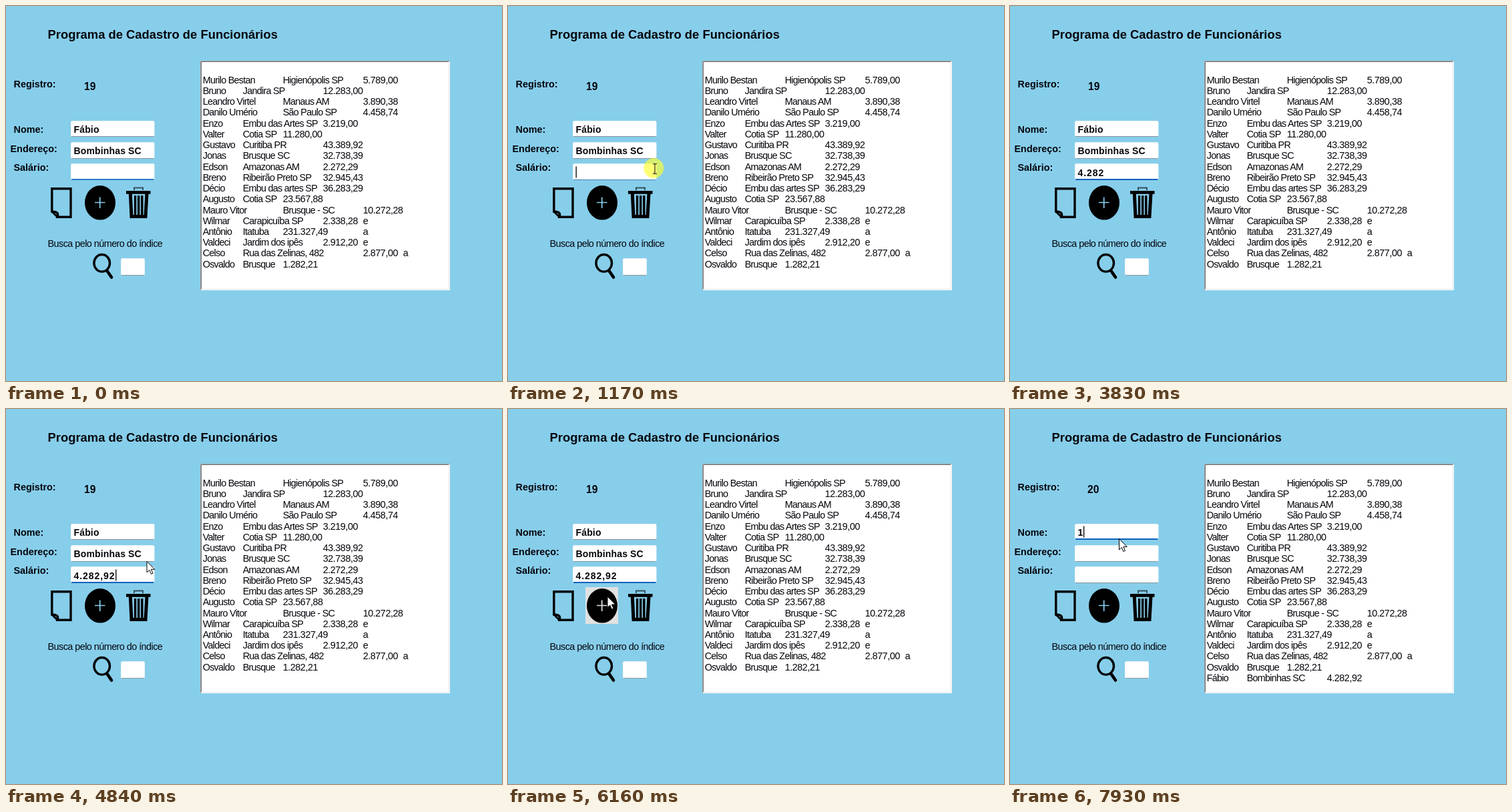
Animation, 743 px wide and 562 px high, one loop 8000 ms. Source, as an HTML page:

```html
<!DOCTYPE html>
<html lang="pt-BR">
<head>
<meta charset="utf-8">
<title>Programa de Cadastro de Funcionários</title>
<style>
html, body { margin: 0; width: 100%; height: 100%; overflow: hidden; background: #87ceeb; }
svg { display: block; width: 743px; height: 562px; }
text { font-family: "Liberation Sans", Arial, sans-serif; font-size: 14.4px; fill: #05050c; white-space: pre; }
.title { font-size: 18.4px; font-weight: bold; }
.label { font-weight: bold; }
.count { font-size: 15.6px; font-weight: bold; }
.input { font-size: 14px; font-weight: bold; letter-spacing: .15px; }
.digits { letter-spacing: .95px; }
.word { letter-spacing: -.74px; }
.number { letter-spacing: -.46px; }
.hint { letter-spacing: -.54px; }
</style>
</head>
<body>
<svg id="stage" viewBox="0 0 743 562" xmlns="http://www.w3.org/2000/svg">
  <rect width="743" height="562" fill="#87ceeb"/>
  <text class="title" x="62.5" y="49">Programa de Cadastro de Funcionários</text>
  <text class="label" x="11.5" y="122">Registro:</text>
  <text class="label" x="11.5" y="189.7">Nome:</text>
  <text class="label" x="6.5" y="218.5">Endereço:</text>
  <text class="label" x="11.5" y="247.3">Salário:</text>
  <text class="count" id="count" y="125.7"></text>
  <text class="hint" x="62.5" y="361">Busca pelo número do índice</text>

  <g id="fields"></g>

  <!-- new sheet -->
  <path d="M68.8 273.7H97V316.2H77Q80 308 68.8 308Z" fill="none" stroke="#000" stroke-width="3.4"/>
  <path d="M68.8 308L77 316.2" stroke="#000" stroke-width="3"/>

  <!-- add -->
  <rect id="hover" x="116" y="267" width="49" height="55" fill="#e1e1e1"/>
  <ellipse cx="141" cy="294.8" rx="23" ry="25.8"/>
  <path id="plus" d="M133 294.5H148.5M140.7 286.5V303" stroke-width="1.7"/>

  <!-- trash -->
  <g fill="none" stroke="#000">
    <path d="M192 276V272.5H205V276" stroke="#35505c" stroke-width="2"/>
    <path d="M180 279.4H216.5" stroke-width="4.6"/>
    <path d="M186.3 281L188 315.6H209L211 281" stroke-width="5"/>
    <path d="M193.6 284V313M198.7 284V313M203.8 284V313" stroke-width="3.4"/>
  </g>

  <!-- search -->
  <ellipse cx="143.7" cy="385.3" rx="11.8" ry="12.8" fill="none" stroke="#000" stroke-width="3.4"/>
  <path d="M151.5 397L158 406.5" stroke="#000" stroke-width="4.6" stroke-linecap="round"/>

  <!-- list box -->
  <rect x="291" y="82" width="374" height="344" fill="#fff"/>
  <g fill="none" stroke-width="1">
    <path d="M291.5 426V82.5H665" stroke="#a0a0a0"/>
    <path d="M292.5 425V83.5H664" stroke="#707070"/>
    <path d="M292 424.5H663.5V83" stroke="#e6e6e6"/>
  </g>
  <g id="list"></g>

  <rect id="caret" width="1.3" height="17"/>
  <circle id="halo" r="15" fill="#ffff2e" fill-opacity=".66"/>
  <path id="arrow" d="M0 0V16.5L3.8 13L6.4 19L9 17.9L6.4 12H11.8Z" fill="#fff" stroke="#000" stroke-width="1"/>
  <path id="beam" d="M-3 -7.5H-1L0 -6.5L1 -7.5H3M0 -6.5V6.5M-3 7.5H-1L0 6.5L1 7.5H3" fill="none" stroke="#222" stroke-width="1.1"/>
</svg>
<script>
const LOOP = 8000;
const SAVED = 6180;
const $ = id => document.getElementById(id);

function add(parent, tag, attrs, content = '') {
  const el = document.createElementNS('http://www.w3.org/2000/svg', tag);
  for (const key in attrs) el.setAttribute(key, attrs[key]);
  el.textContent = content;
  parent.appendChild(el);
  return el;
}
const show = (el, on) => el.setAttribute('visibility', on ? 'visible' : 'hidden');
const place = (el, x, y) => el.setAttribute('transform', `translate(${x} ${y})`);

// Each bar skips to the next tab stop.
const rows = [
  'Murilo Bestan||Higienópolis SP||5.789,00',
  'Bruno|Jandira SP||12.283,00',
  'Leandro Virtel||Manaus AM||3.890,38',
  'Danilo Umério||São Paulo SP||4.458,74',
  'Enzo|Embu das Artes SP||3.219,00',
  'Valter|Cotia SP|11.280,00',
  'Gustavo|Curitiba PR||43.389,92',
  'Jonas|Brusque SC||32.738,39',
  'Edson|Amazonas AM||2.272,29',
  'Breno|Ribeirão Preto SP||32.945,43',
  'Décio|Embu das artes SP||36.283,29',
  'Augusto|Cotia SP|23.567,88',
  'Mauro Vitor||Brusque - SC||10.272,28',
  'Wilmar|Carapicuíba SP||2.338,28|e',
  'Antônio|Itatuba|231.327,49||a',
  'Valdeci|Jardim dos ipês||2.912,20|e',
  'Celso|Rua das Zelinas, 482|||2.877,00|a',
  'Osvaldo|Brusque|1.282,21',
  'Fábio|Bombinhas SC||4.282,92'
];
const lines = rows.map((row, i) => {
  const line = add($('list'), 'g', {});
  row.split('|').forEach((cell, col) => {
    if (!cell) return;
    add(line, 'text', {
      x: 294.7 + 60 * col,
      y: 115.8 + 16.23 * i,
      class: /^\d/.test(cell) ? 'number' : 'word'
    }, cell);
  });
  return line;
});

function field(x, y, w, h, base) {
  const g = $('fields');
  add(g, 'rect', { x, y, width: w, height: h, rx: 2.5, fill: '#eef4f7' });
  add(g, 'rect', { x: x + 1, y: y + 1, width: w - 2, height: h - 2, rx: 2, fill: '#fff' });
  const edge = add(g, 'rect', { x: x + 1, width: w - 2 });
  const text = add(g, 'text', { class: 'input', x: x + 4.5, y: base });
  return { x, y, w, h, edge, text };
}
const nameBox = field(97, 172, 125.5, 24, 189.7);
const cityBox = field(97, 204, 125.5, 25, 222.2);
const payBox = field(97, 236, 125.5, 25, 254.5);
const searchBox = field(172, 378, 36, 26, 398);
const boxes = [nameBox, cityBox, payBox, searchBox];
payBox.text.setAttribute('class', 'input digits');

function setEdge(box, color, thick) {
  box.edge.setAttribute('fill', color);
  box.edge.setAttribute('height', thick);
  box.edge.setAttribute('y', box.y + box.h - thick);
}

const pay = '4.282,92';
const keys = [2250, 2450, 2710, 2840, 3300, 3900, 4250, 4380];
const nameKey = 7650;

// Pointer stops: time, x, y
const path = [
  [70, 651, 535], [280, 553, 470], [500, 434, 470], [700, 290, 350],
  [830, 234, 268], [970, 222, 247], [1170, 220, 244], [1300, 220, 244],
  [1380, 211.5, 247], [4780, 211.5, 247], [4840, 210.5, 229],
  [4910, 246, 182], [5050, 225, 152], [5250, 165, 200], [5400, 143, 275],
  [5540, 141.5, 305], [5640, 141.5, 305], [5820, 149, 281], [6970, 149, 281],
  [7150, 160, 248], [7330, 166, 190], [7750, 166, 186], [7930, 163.5, 194.5]
];
function pointer(t) {
  const i = path.findIndex(p => p[0] > t);
  if (i < 1) return i ? path[path.length - 1].slice(1) : path[0].slice(1);
  const [t0, x0, y0] = path[i - 1], [t1, x1, y1] = path[i];
  const k = (t - t0) / (t1 - t0);
  return [x0 + (x1 - x0) * k, y0 + (y1 - y0) * k];
}
const inside = (b, x, y) => x >= b.x && x < b.x + b.w && y >= b.y && y < b.y + b.h - 2;
const addButton = { x: 116, y: 267, w: 49, h: 57 };

// Carets restart their blink on every click or key.
const wakes = [300, 850, ...keys, 7400, nameKey];
function caretOn(t) {
  const wake = wakes.filter(w => w <= t).pop();
  return wake !== undefined && Math.floor((t - wake) / 530) % 2 === 0;
}

function draw(t) {
  const saved = t >= SAVED;
  const typed = keys.filter(k => k <= t).length;
  const focus = !saved ? payBox : t >= 7400 ? nameBox : null;

  $('count').textContent = saved ? '20' : '19';
  $('count').setAttribute('x', saved ? 116 : 117);
  show(lines[lines.length - 1], saved);
  nameBox.text.textContent = !saved ? 'Fábio' : t >= nameKey ? '1' : '';
  cityBox.text.textContent = saved ? '' : 'Bombinhas SC';
  payBox.text.textContent = saved ? '' : pay.slice(0, typed);

  boxes.forEach(box => setEdge(box, '#8b9499', 1));
  if (focus) {
    const pressed = t >= 900 && t < 1380;
    setEdge(focus, pressed ? '#477fae' : t < 900 ? '#2b7cc4' : '#0b62bd', pressed ? 1 : 2);
    let x = 101.5;
    if (focus === payBox) for (const c of pay.slice(0, typed)) x += /\d/.test(c) ? 8.7 : 5.2;
    else if (t >= nameKey) x = 110;
    $('caret').setAttribute('x', x);
    $('caret').setAttribute('y', focus === payBox ? 240.5 : 175.5);
  }
  show($('caret'), focus && caretOn(t));

  const [x, y] = pointer(t);
  const visible = t >= 70 && (t < 2250 || t >= 4840);
  const onField = boxes.some(b => inside(b, x, y));
  const onButton = visible && inside(addButton, x, y);
  place($('arrow'), x, y);
  place($('beam'), x, y);
  place($('halo'), x - 1.7, y - 1);
  show($('arrow'), visible && !onField);
  show($('beam'), visible && onField);
  show($('halo'), t >= 1040 && t < 1310);
  show($('hover'), onButton);
  $('plus').setAttribute('stroke', onButton ? '#e1e1e1' : '#87ceeb');
}

const start = performance.now();
function tick() {
  draw((performance.now() - start) % LOOP);
  requestAnimationFrame(tick);
}
tick();
</script>
</body>
</html>
```
